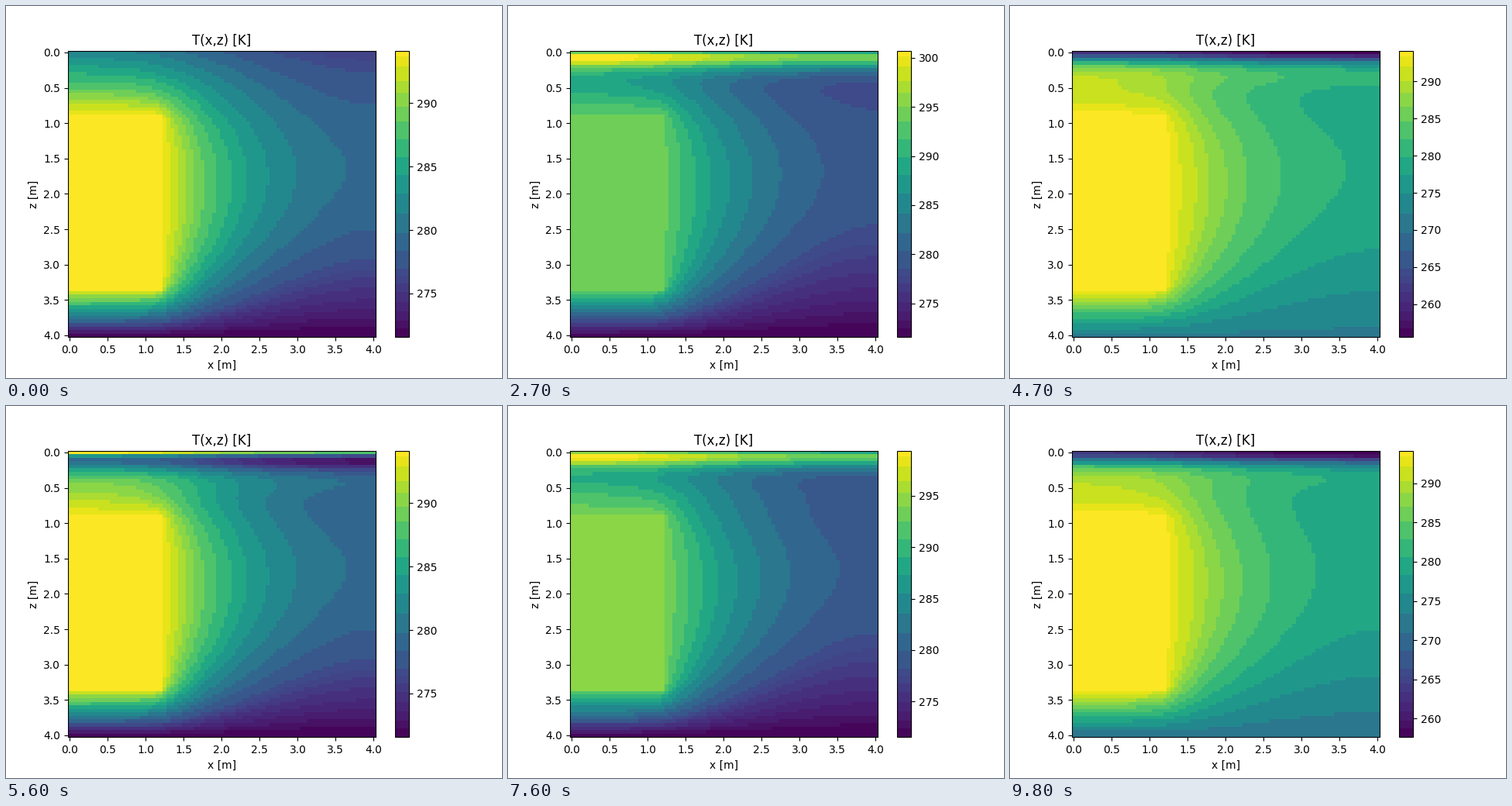
A matplotlib script for the animation above (9.9 s loop, 640 by 480 pixels).

```python
import numpy as np
import matplotlib.pyplot as plt
from matplotlib.animation import FuncAnimation
from matplotlib.colors import ListedColormap

FRAMES = 99
DAY = 49.75            # frames per heating cycle
STEPS = 6              # diffusion steps per frame
N, SIZE = 81, 4.0
D = SIZE / (N - 1)
DIFFUSIVITY = 5e-7 * 86400 / DAY   # m^2 per frame

WARM, COLD, AIR = 294.15, 271.55, 273.5
LOSS = 1.6             # surface heat loss, 1/m
HEATING = 355.0        # amplitude of the surface heating, K/m

room = np.zeros((N, N), bool)
room[18:68, :25] = True


def apply_bounds(T, below, heating):
    T[0] = (below + D * (LOSS * AIR + heating)) / (1 + D * LOSS)
    T[-1] = COLD
    T[room] = WARM


def neighbour_mean(T):
    p = np.pad(T, 1, mode="reflect")
    return (p[:-2, 1:-1] + p[2:, 1:-1] + p[1:-1, :-2] + p[1:-1, 2:]) / 4


def steady_state():
    """Red-black over-relaxation without surface heating."""
    T = np.full((N, N), 279.0)
    red = np.indices((N, N)).sum(axis=0) % 2 == 0
    for _ in range(1000):
        for cells in (red, ~red):
            goal = neighbour_mean(T)
            apply_bounds(goal, T[1], 0)
            T[cells] += 1.94 * (goal - T)[cells]
    return T


def simulate():
    T = steady_state()
    fields = [T.copy()]
    rate = 4 * DIFFUSIVITY / STEPS / D**2
    for step in range(1, (FRAMES - 1) * STEPS + 1):
        T += rate * (neighbour_mean(T) - T)
        phase = 2 * np.pi * step / STEPS / DAY
        apply_bounds(T, T[1], HEATING * np.sin(phase))
        if step % STEPS == 0:
            fields.append(T.copy())
    return fields


def banded_viridis():
    edges = np.array([0, .03, .06, .09, .122, .155, .188, .212, .24, .30,
                      .362, .43, .50, .565, .63, .693, .752, .803, .85,
                      .896, .945, .98, 1])
    middles = (edges[:-1] + edges[1:]) / 2
    middles[-1] = 0.995
    band = np.searchsorted(edges, (np.arange(256) + 0.5) / 256) - 1
    return ListedColormap(plt.get_cmap("viridis")(middles[band]))


fields = simulate()
axis = np.linspace(0, SIZE, N)

fig, ax = plt.subplots(figsize=(6.4, 4.8), dpi=100)
mesh = ax.pcolormesh(axis, axis, fields[0], cmap=banded_viridis(),
                     shading="nearest")
ax.invert_yaxis()
ax.set_title("T(x,z) [K]")
ax.set_xlabel("x [m]")
ax.set_ylabel("z [m]")
fig.colorbar(mesh, ax=ax)


def update(i):
    T = fields[i]
    mesh.set_array(T)
    mesh.set_clim(T.min(), T.max())
    return [mesh]


anim = FuncAnimation(fig, update, frames=FRAMES, interval=100,
                     init_func=lambda: update(0), repeat=True,
                     repeat_delay=0, blit=False)
plt.show()
```
